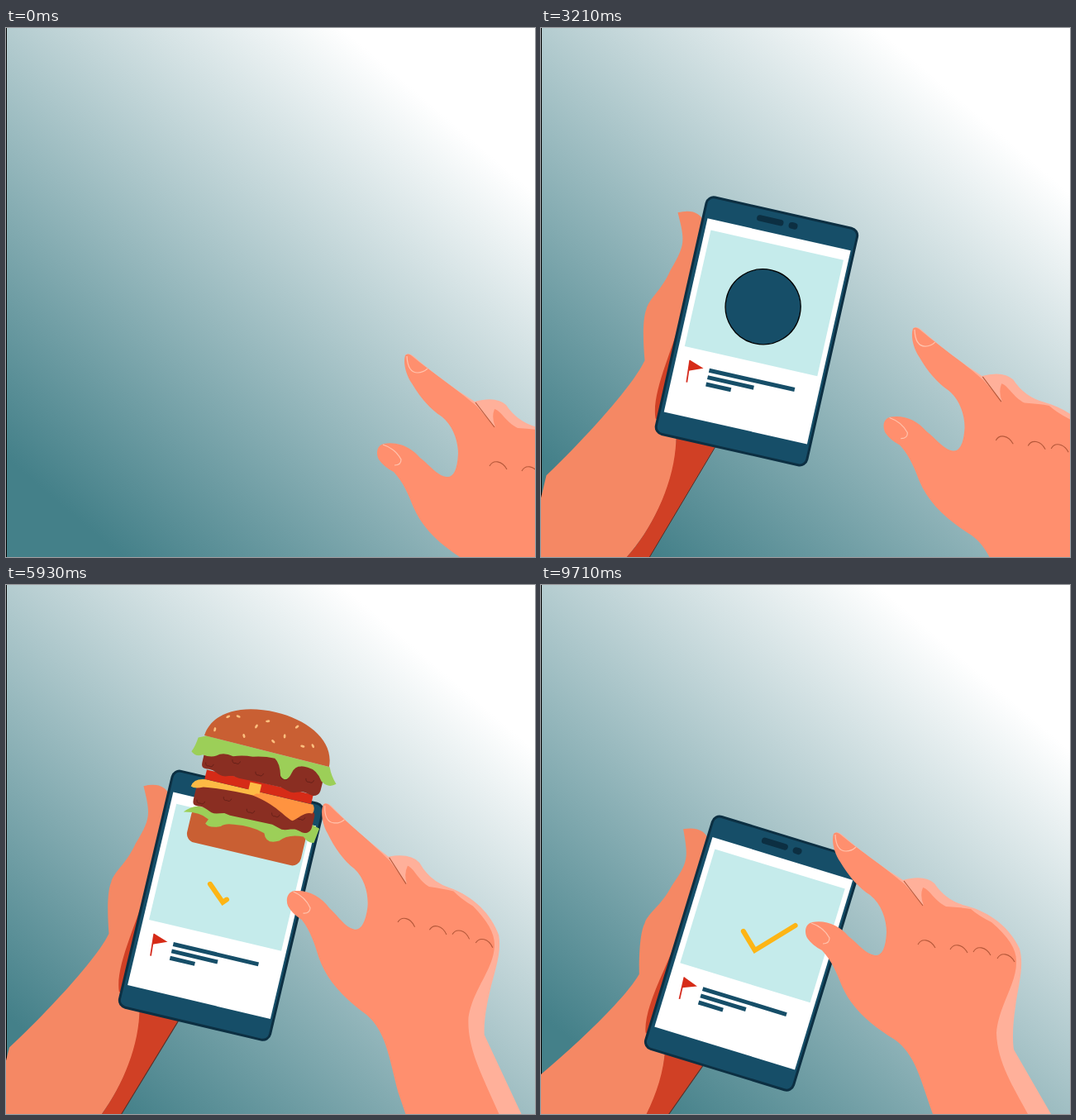
These frames come from a looping animation (640x640 px, 9780 ms). An HTML page:

```html
<!DOCTYPE html>
<html lang="en">
<head>
<meta charset="utf-8">
<title>Ordering a burger</title>
<style>
  html, body { margin: 0; height: 100%; overflow: hidden; }
  svg { display: block; width: 100vw; height: 100vh; }
  path { fill: none; }
  .navy { fill: #164e68; }
  .ink { fill: #0c2f42; }
  .arm { fill: #f58864; }
  .shade { fill: #d04025; }
  .skin { fill: #ff8f6e; }
  .rim { fill: #ffb09a; }
  .bun { fill: #c95f33; }
  .leaf { fill: #9ccf58; }
  .meat { fill: #8a2e22; }
  .red { fill: #d62b17; }
  .cheese { fill: #fdba45; }
  .sauce { fill: #ff9340; }
  .crease { stroke: #b5583a; stroke-width: 1.1; }
  .nail { stroke: #ffc3ad; stroke-width: 1.2; }
</style>
</head>
<body>
<svg viewBox="0 0 640 640">
  <defs>
    <linearGradient id="sky" gradientUnits="userSpaceOnUse" x1="172" y1="-201" x2="-257" y2="300">
      <stop stop-color="#fff"/><stop offset="1" stop-color="#448089"/>
    </linearGradient>
    <g id="patty">
      <path id="meat" class="meat"/>
      <path id="crumbs" stroke="#642018"/>
    </g>
  </defs>

  <rect width="640" height="640" fill="url(#sky)"/>
  <rect width="1" height="640"/>

  <g class="phone">
    <g transform="rotate(-12.7) translate(-201 -230)">
      <path class="arm" d="M165 223Q190 217 197 235L215 300L200 520L163 498C164 545 135 605 103 640L50 705H-32L0 566L6 541C50 499 110 434 125 402C123 380 122 352 127 340C130 327 145 318 156 293C174 262 174 258 165 223Z"/>
      <path class="shade" d="M168 352C160 387 133 440 138 472L163 490C164 545 135 605 103 640L50 705H92L212 503L210 350Z"/>
      <path stroke="#5c2a20" d="M210 507L92 705"/>
    </g>
    <rect class="navy" x="-5.5" y="-26.7" width="187" height="293.7" rx="9" stroke="#0c2f42" stroke-width="3"/>
    <rect width="177.5" height="240" fill="#fff"/>
    <rect x="7" y="13" width="164.5" height="144" fill="#c5ebeb"/>
    <rect class="ink" x="58" y="-18" width="33" height="7.5" rx="3.7"/>
    <rect class="ink" x="97.5" y="-18" width="11" height="8" rx="4"/>
    <circle id="dot" class="navy" cx="89" cy="89.6" stroke="#000" stroke-width="1.3"/>
    <path id="check" pathLength="100" stroke="#fdb515" stroke-width="6" stroke-linecap="round" d="M69 98L89 116L127 73"/>
  </g>

  <g id="burger">
    <rect class="bun" x="254" y="190" width="171" height="53" rx="13"/>
    <path class="leaf" d="M242 203Q255 187 270 190L428 184L430 178L441 181L438 203Q430 206 421 198Q398 199 388 212Q370 222 364 206Q345 200 318 204Q305 205 300 211Q283 218 277 212L280 205Q265 197 242 203Z"/>
    <use href="#patty" y="56"/>
    <path class="cheese" d="M244 164Q246 149 270 149H344V156Q290 156 262 161Q250 167 244 164Z"/>
    <path class="sauce" d="M344 149H424Q429 155 426 162C415 161 408 173 400 179C385 175 373 162 335 156Z"/>
    <rect class="red" x="261" y="135" width="160" height="14"/>
    <rect class="cheese" x="327" y="138" width="17" height="14"/>
    <use href="#patty"/>
    <path class="leaf" d="M249 87L435 90Q440 102 450 112Q440 121 428 113Q418 98 404 98Q386 96 383 111Q379 129 368 119Q363 101 354 96Q338 96 322 101Q308 102 294 107Q278 104 270 112Q262 117 250 115Q241 121 233 114Q237 105 238 92Z"/>
    <path class="bun" d="M246 87C249 50 290 30 340 30C390 30 433 52 434 90Z"/>
    <g id="seeds" fill="#fcbf7e"></g>
  </g>

  <g class="phone">
    <g id="flag">
      <path stroke="#d52b1e" stroke-width="1.8" d="M17 172L19 199"/>
      <path class="red" d="M17 172L35 178L18 185Z"/>
    </g>
    <path id="lines" stroke="#164e68" stroke-width="5"/>
    <path id="sparks" stroke="#fff" stroke-width="3" stroke-linecap="round"/>
  </g>

  <g id="hand">
    <g transform="translate(-356 -299)">
      <path class="rim" d="M354 301Q358 297 364 302C385 320 405 336 438 357Q464 350 476 361Q490 382 514 388C545 396 568 416 579 440C585 462 577 486 574 510C571 530 570 548 572 562L617 640L675 740H600L450 420Z"/>
      <path class="skin" d="M354 301Q357 298 361 301C385 321 414 340 440 362L463 388Q458 376 462 366C470 368 476 382 490 389Q508 390 520 392Q529 400 545 408C565 425 575 440 575 455C576 482 553 510 551 542C552 578 572 608 589 640L645 740H518L474 640C459 598 453 568 428 550C395 530 375 510 364 485C358 470 352 455 340 442Q328 436 322 427C318 419 320 410 328 408C345 405 361 412 372 425C385 435 392 446 404 448C412 449 417 440 418 420C418 405 412 386 398 375C385 367 372 352 362 335C355 325 351 310 354 301Z"/>
      <path class="nail" d="M356 302Q357 322 369 322Q376 322 381 317M327 409Q342 414 349 427Q349 434 341 434"/>
      <path class="crease" d="M439 358L462 388M456 435c4 -8 15 -7 21 4m18 2c4 -8 15 -7 21 4m7 -1c4 -8 15 -7 21 4m8 4c4 -8 15 -7 21 4"/>
    </g>
  </g>
</svg>
<script>
const LOOP = 9780, STEP = 71.4, TAU = 2 * Math.PI;
const $ = id => document.getElementById(id);
const set = (id, name, value) => $(id).setAttribute(name, value);
const show = (id, on) => set(id, 'visibility', on ? 'visible' : 'hidden');
const mix = (a, b, p) => a + (b - a) * p;
const place = (el, x, y, angle, extra = '') =>
  el.setAttribute('transform', `translate(${x} ${y}) rotate(${angle}) ${extra}`);
const repeat = (n, make) => Array.from({ length: n }, (_, k) => make(k)).join('');

// Smooth progress from 0 to 1 between two times
function ease(t, from, to) {
  const u = Math.min(1, Math.max(0, (t - from) / (to - from)));
  return u * u * (3 - 2 * u);
}

// A rounded slab with a rippled edge
function slab(cx, cy, rx, ry) {
  const bend = v => Math.sign(v) * Math.abs(v) ** .35;
  return 'M' + repeat(120, k => {
    const a = k * TAU / 120, x = cx + rx * bend(Math.cos(a));
    return `${x} ${cy + ry * bend(Math.sin(a)) + 2 * Math.sin(x / 5.5)} `;
  }) + 'Z';
}

set('meat', 'd', slab(341, 117, 89, 20));
set('crumbs', 'd', repeat(5, k =>
  `M${257 + 37 * k} ${118 + 7 * Math.cos(2.6 * k)}q1 6 6 4q5 2 6 -4`));
$('seeds').innerHTML = repeat(11, k =>
  `<ellipse rx="1.7" ry="3.2" transform="translate(${259 + 14.5 * k} ${59 + 16 * Math.cos(2 * k)}) rotate(${50 * k})"/>`);

function draw(t) {
  // Phone slides in, then sinks and tilts
  const enter = ease(t, 0, 2170), settle = ease(t, 1500, 2300);
  const drop = ease(t, 5290, 7150), swing = ease(t, 5500, 7290);
  document.querySelectorAll('.phone').forEach(el => place(el,
    mix(-203, 201.5, enter) + 6 * swing,
    251 - 20.7 * settle + 74.7 * drop,
    mix(-3.3, 12.7, enter) + 4.3 * swing));

  // Hand reaches in, lifts, and tucks behind the edge
  const reach = ease(t, 2650, 4250), lift = ease(t, 4290, 5250), tuck = ease(t, 6500, 7250);
  place($('hand'),
    485 - 116 * reach + 17 * lift - 30 * tuck,
    394 - 113 * reach - 23 * lift + 41 * swing,
    2.5 * reach + 2.4 * lift - 4.9 * tuck);

  // Burger grows on the screen, flies up and pulses
  const grow = ease(t, 4450, 5250), rise = ease(t, 5290, 6400);
  const pulse = .997 + .028 * Math.cos((t - 8400) / 1250 * TAU);
  place($('burger'),
    mix(mix(268, 254, grow), 341, rise),
    mix(mix(337, 401, grow), 137, rise),
    34 * (1 - rise),
    `scale(${mix(.52 * grow, pulse, rise)}) translate(-341 -137)`);
  show('burger', grow > 0 && t < 9700);

  const shrink = 1 - ease(t, 4290, 4750);
  set('dot', 'r', 45.5 * shrink);
  show('dot', shrink > 0);

  const raise = ease(t, 1490, 2250);
  set('flag', 'transform', `translate(0 199) scale(1 ${raise}) translate(0 -199)`);
  show('flag', raise > 0);
  set('lines', 'd', repeat(3, i =>
    `M42.3 ${179 + 8.6 * i}h${106 * .54 ** i * ease(t, 1900 + 150 * i, 2600 + 150 * i)}`));

  const burst = (t - 4900) / 780, length = 12 * Math.min(burst, 1 - burst);
  set('sparks', 'd', length > 0 ? repeat(8, k => {
    const c = Math.cos(k * TAU / 8), s = Math.sin(k * TAU / 8), r = 60 * burst;
    return `M${91 + r * c} ${91 + r * s}l${length * c} ${length * s}`;
  }) : '');

  const tick = ease(t, 5650, 6300);
  set('check', 'stroke-dasharray', `${100 * tick} 200`);
  show('check', tick > 0);
}

function frame() {
  const t = performance.now() % LOOP;
  draw(Math.floor((t + 5) / STEP) * STEP);
  requestAnimationFrame(frame);
}
frame();
</script>
</body>
</html>
```
